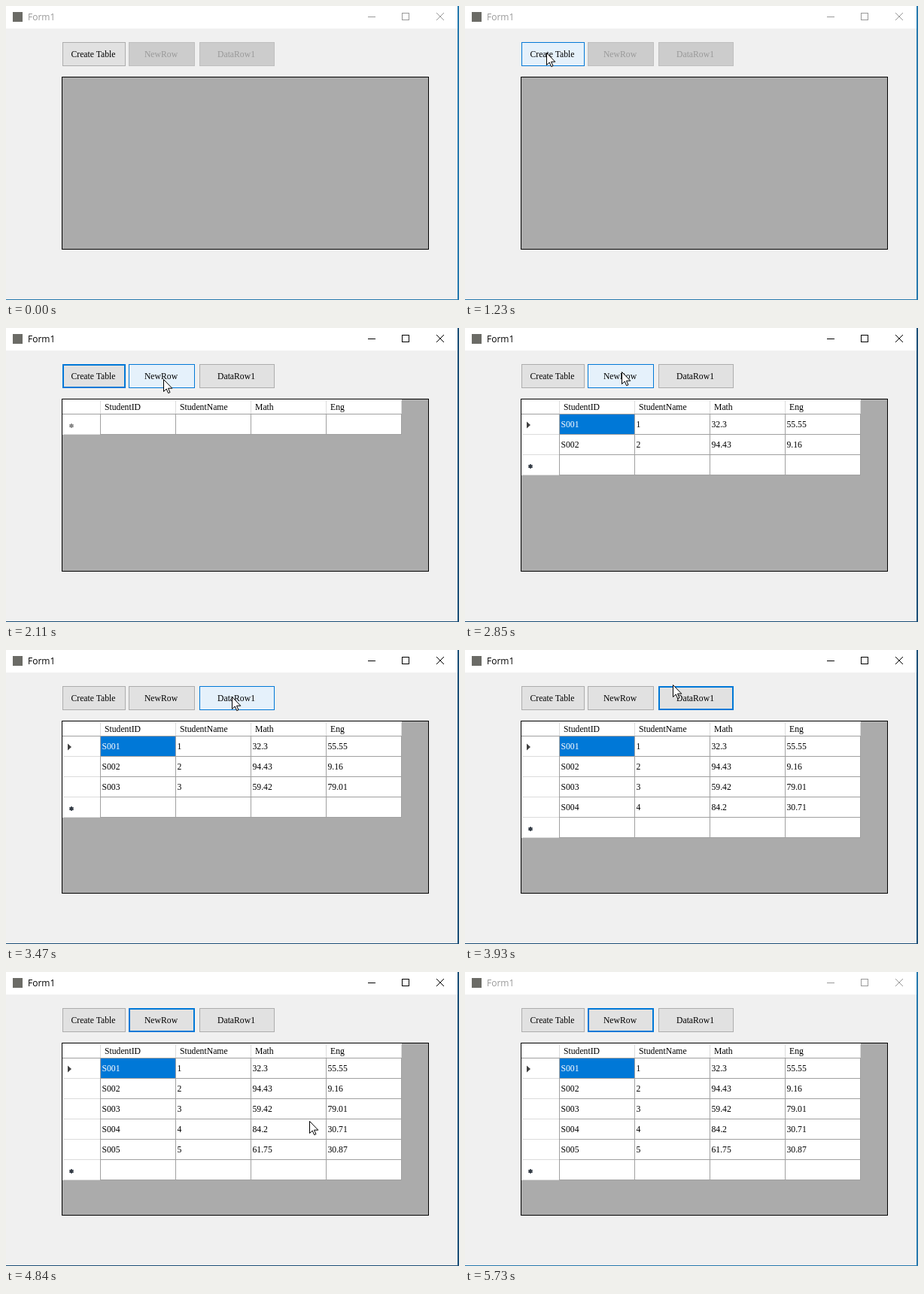
These frames come from a looping animation (602x391 px, 5800 ms). An HTML page:

```html
<!DOCTYPE html>
<html lang="en">
<head>
<meta charset="utf-8">
<title>Form1</title>
<style>
  html, body { margin: 0; width: 100%; height: 100%; overflow: hidden; background: #f0f0f0; }
  svg { display: block; }
  text { font: 11.7px "Liberation Serif", "Noto Serif", serif; fill: #000; white-space: pre; }
  #title { font: 12px "Open Sans", "Noto Sans", sans-serif; }
  rect, line { shape-rendering: crispEdges; }
</style>
</head>
<body>
<svg id="stage" width="602" height="391" viewBox="0 0 602 391"></svg>
<script>
const LOOP = 5800;
const HEADERS = ["StudentID", "StudentName", "Math", "Eng"];
const ROWS = [
  ["S001", "1", "32.3", "55.55"],
  ["S002", "2", "94.43", "9.16"],
  ["S003", "3", "59.42", "79.01"],
  ["S004", "4", "84.2", "30.71"],
  ["S005", "5", "61.75", "30.87"]
];
const ROW_H = 27, TOP = 114;

// Hard state changes: [time, changes]
const STEPS = [
  [0, { active: false, table: false, rows: 0, focus: -1, press: -1 }],
  [1300, { active: true, focus: 0, press: 0 }],
  [1370, { table: true, press: -1 }],
  [2180, { focus: 1, press: 1 }],
  [2240, { rows: 1, press: -1 }],
  [2780, { press: 1 }],
  [2850, { rows: 2, press: -1 }],
  [3330, { focus: 2, press: 2 }],
  [3400, { rows: 3, press: -1 }],
  [3600, { press: 2 }],
  [3670, { rows: 4, press: -1 }],
  [4140, { focus: 1, press: 1 }],
  [4210, { rows: 5, press: -1 }],
  [5730, { active: false }]
];

// Pointer tip: [time, x, y]
const PATH = [
  [530, 112, 270], [1090, 108, 64], [1230, 108, 62], [1830, 108, 62],
  [2110, 209, 68], [2240, 209, 68], [2380, 213, 43], [2710, 213, 43],
  [2780, 208, 58], [2920, 208, 58], [3260, 300, 62], [3690, 300, 62],
  [3880, 276, 46], [3930, 276, 46], [4130, 227, 62], [4560, 227, 62],
  [5120, 578, 332], [5190, 577, 340], [5330, 566, 391]
];

const stage = document.getElementById("stage");

function add(tag, attrs, parent = stage, content = "") {
  const node = document.createElementNS("http://www.w3.org/2000/svg", tag);
  set(node, attrs);
  node.textContent = content;
  return parent.appendChild(node);
}
function set(node, attrs) {
  for (const key in attrs) node.setAttribute(key, attrs[key]);
}
const box = (x, y, width, height, fill, parent) => add("rect", { x, y, width, height, fill }, parent);
const label = (x, y, content, parent, attrs) => add("text", { x, y, ...attrs }, parent, content);
const show = (node, on) => set(node, { visibility: on ? "visible" : "hidden" });

// Window frame
box(0, 0, 602, 391, "#f0f0f0");
box(0, 0, 600, 30, "#fff");
const edges = [box(600, 0, 2, 391), box(0, 390, 602, 1)];
box(9, 8, 13, 13, "#6b6b66");
const title = label(29, 19, "Form1", stage, { id: "title" });
const controls = add("g", { fill: "none" });
add("path", { d: "M481 14.5h10M526.5 9.5h9v9h-9z", "shape-rendering": "crispEdges" }, controls);
add("path", { d: "M572 9l10 10M582 9l-10 10" }, controls);

// Buttons
const buttons = [
  { x: 75, w: 84, text: "Create Table" },
  { x: 163, w: 88, text: "NewRow" },
  { x: 257, w: 100, text: "DataRow1" }
];
for (const b of buttons) {
  b.rim = box(b.x, 48, b.w, 32);
  b.face = box(0, 0, 0, 0);
  b.label = label(b.x + b.w / 2 - 1, 68, b.text, stage, { "text-anchor": "middle" });
}

// Data grid
box(74, 94, 488, 230, "#000");
box(75, 95, 486, 228, "#ababab");
const table = add("g", {});
box(75, 95, 451, 20, "#fff", table);
box(75, 114, 451, 1, "#a0a0a0", table);
for (let c = 0; c < 5; c++) box(125 + c * 100, 96, 1, 18, "#dcdcdc", table);
HEADERS.forEach((name, c) => label(131 + c * 100, 109, name, table));

function addRow(y) {
  const row = add("g", {}, table);
  box(75, y + 1, 451, 27, "#fff", row);
  box(76, y + 27, 49, 1, "#dcdcdc", row);
  box(125, y + 27, 401, 1, "#a0a0a0", row);
  for (let c = 0; c < 5; c++) box(125 + c * 100, y + 1, 1, 27, "#a0a0a0", row);
  return row;
}
const rows = ROWS.map((cells, r) => {
  const y = TOP + r * ROW_H, row = addRow(y);
  if (r === 0) {
    box(126, y + 1, 99, 26, "#0078d7", row);
    add("path", { d: "M82 124.5v9l5-4.5z", fill: "#404040" }, row);
  }
  cells.forEach((value, c) =>
    label(127.5 + c * 100, y + 18, value, row, r + c ? {} : { style: "fill:#fff" }));
  return row;
});
const blankRow = addRow(TOP);
const star = add("path", {
  d: "M87 127v6M84.3 128.5l5.4 3M89.7 128.5l-5.4 3", "stroke-width": 1.6
}, blankRow);

const pointer = add("path", {
  d: "M.5 .5V16.5L4.2 13L6.7 18.6L9 17.6L6.5 12.2H11.8Z",
  fill: "#fff", stroke: "#000", "stroke-width": 1
});

function stateAt(t) {
  return Object.assign({}, ...STEPS.filter(([at]) => at <= t).map(([, change]) => change));
}

function pointerAt(t) {
  const next = PATH.findIndex(([at]) => at > t);
  if (next < 1) return null;
  const [t0, x0, y0] = PATH[next - 1], [t1, x1, y1] = PATH[next];
  const p = (t - t0) / (t1 - t0), k = p * p * (3 - 2 * p);
  return { x: x0 + (x1 - x0) * k, y: y0 + (y1 - y0) * k };
}

function buttonLook(enabled, pressed, hovered, focused) {
  if (!enabled) return ["#bfbfbf", "#ccc", 1];
  if (pressed) return ["#005499", "#cce4f7", 1];
  if (hovered) return ["#0078d7", "#e5f1fb", 1];
  return focused ? ["#0078d7", "#e1e1e1", 2] : ["#adadad", "#e1e1e1", 1];
}

function render(t) {
  const s = stateAt(t), tip = pointerAt(t);
  const ink = s.active ? "#000" : "#999";
  edges.forEach(edge => set(edge, { fill: s.active ? "#1c4f78" : "#2679ae" }));
  title.style.fill = ink;
  set(controls, { stroke: ink });

  buttons.forEach((b, i) => {
    const enabled = i === 0 || s.table;
    const hovered = tip && tip.x >= b.x && tip.x < b.x + b.w && tip.y >= 48 && tip.y < 80;
    const [rim, face, line] = buttonLook(enabled, s.press === i, hovered, s.focus === i);
    set(b.rim, { fill: rim });
    set(b.face, { x: b.x + line, y: 48 + line, width: b.w - 2 * line, height: 32 - 2 * line, fill: face });
    b.label.style.fill = enabled ? "#000" : "#999";
  });

  show(table, s.table);
  rows.forEach((row, r) => show(row, s.table && r < s.rows));
  set(blankRow, { transform: `translate(0 ${s.rows * ROW_H})` });
  set(star, { stroke: s.rows ? "#333b45" : "#888" });

  show(pointer, tip);
  if (tip) set(pointer, { transform: `translate(${Math.round(tip.x)} ${Math.round(tip.y)})` });
}

const start = performance.now();
function tick() {
  render((performance.now() - start) % LOOP);
  requestAnimationFrame(tick);
}
tick();
</script>
</body>
</html>
```
